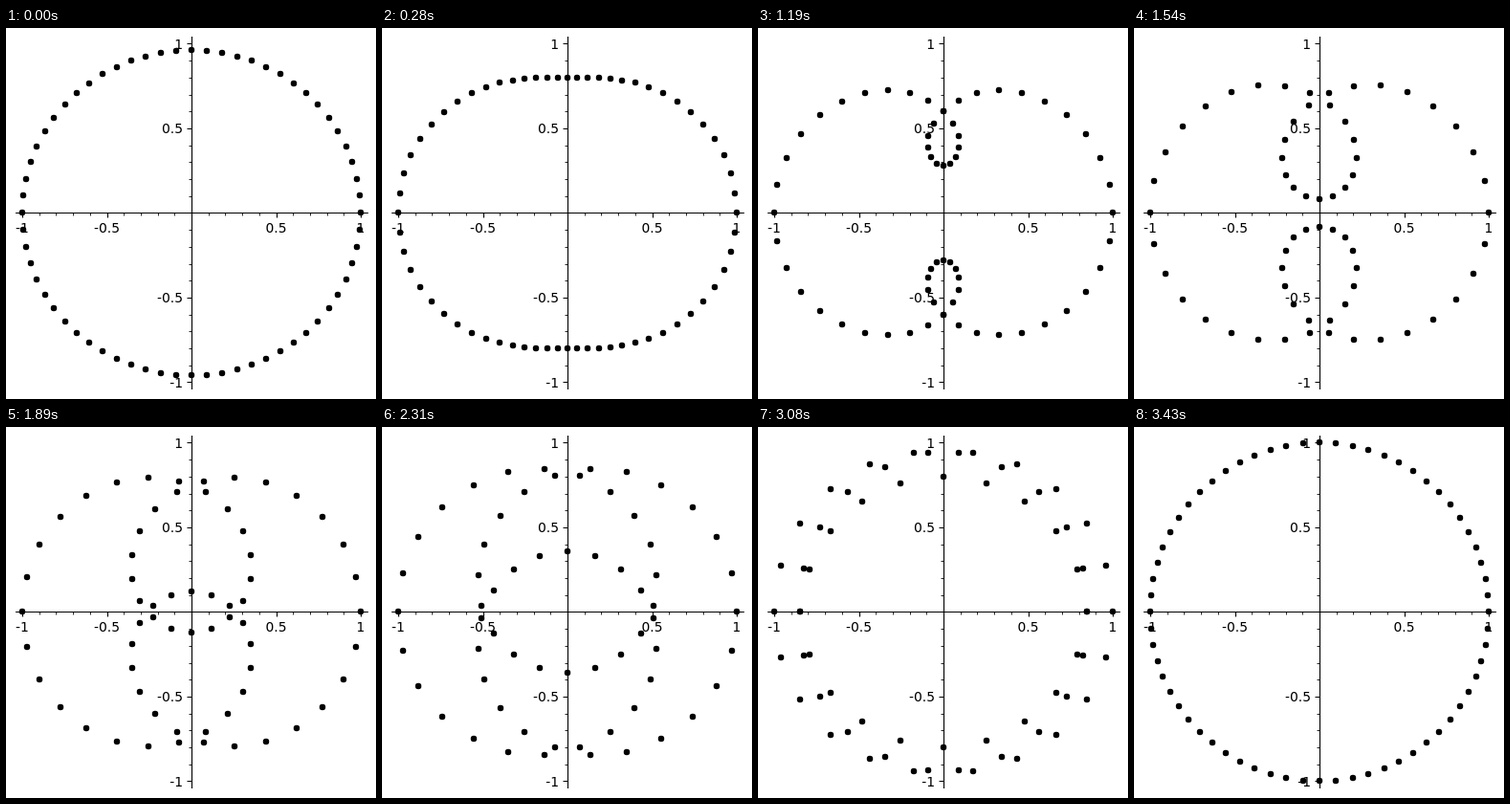
Animation, 387 px wide and 388 px high, one loop 3500 ms. Source, as an HTML page:

```html
<!DOCTYPE html>
<html lang="en">
<head>
<meta charset="utf-8">
<title>Circle wrapping onto itself</title>
<style>
  html, body { margin: 0; width: 100%; height: 100%; overflow: hidden; background: #fff; }
  svg { display: block; }
  path { stroke: #000; fill: none; }
  text { font: 13.89px "DejaVu Sans", sans-serif; }
</style>
</head>
<body>
<svg id="plot" width="387" height="388" viewBox="0 0 387 388"></svg>
<script>
const CX = 194, CY = 193.4, UNIT = 177;
const POINTS = 64, STEPS = 50, STEP_MS = 70;
const plot = document.getElementById("plot");

function add(tag, attrs, text = "") {
  const el = document.createElementNS("http://www.w3.org/2000/svg", tag);
  for (const key in attrs) el.setAttribute(key, attrs[key]);
  el.textContent = text;
  return plot.appendChild(el);
}

// Lines sit on pixel centres, dots on whole pixels
const snap = v => Math.round(v) + 0.5;
const axisX = snap(CX), axisY = snap(CY);

// Axes
add("path", { d: `M10 ${axisY}H379M${axisX} 9V378`, "stroke-width": 1.11 });

// Ticks every 0.1, labelled every 0.5
for (let i = -10; i <= 10; i++) {
  if (!i) continue;
  const major = i % 5 === 0;
  const len = major ? 5 : 3;
  const x = CX + i / 10 * UNIT, y = CY - i / 10 * UNIT;
  add("path", {
    d: `M${snap(x)} ${axisY}v${len}M${axisX} ${snap(y)}h${-len}`,
    "stroke-width": major ? 1.11 : 0.83
  });
  if (major) {
    add("text", { x, y: 214, "text-anchor": "middle" }, i / 10);
    add("text", { x: 185, y: Math.round(y + 5.3), "text-anchor": "end" }, i / 10);
  }
}

const dots = Array.from({ length: POINTS }, () => add("circle", { r: 3.24 }));

// Each dot slides in a straight line from z to z³ on the unit circle
function draw(now) {
  const t = (Math.floor(now / STEP_MS) % STEPS + 1) / STEPS;
  dots.forEach((dot, i) => {
    const a = 2 * Math.PI * i / POINTS;
    const mix = f => (1 - t) * f(a) + t * f(3 * a);
    dot.setAttribute("cx", Math.round(CX + UNIT * mix(Math.cos)));
    dot.setAttribute("cy", Math.round(CY - UNIT * mix(Math.sin)));
  });
}

let start;
function tick(now) {
  start ??= now;
  draw(now - start);
  requestAnimationFrame(tick);
}
draw(0);
requestAnimationFrame(tick);
</script>
</body>
</html>
```
